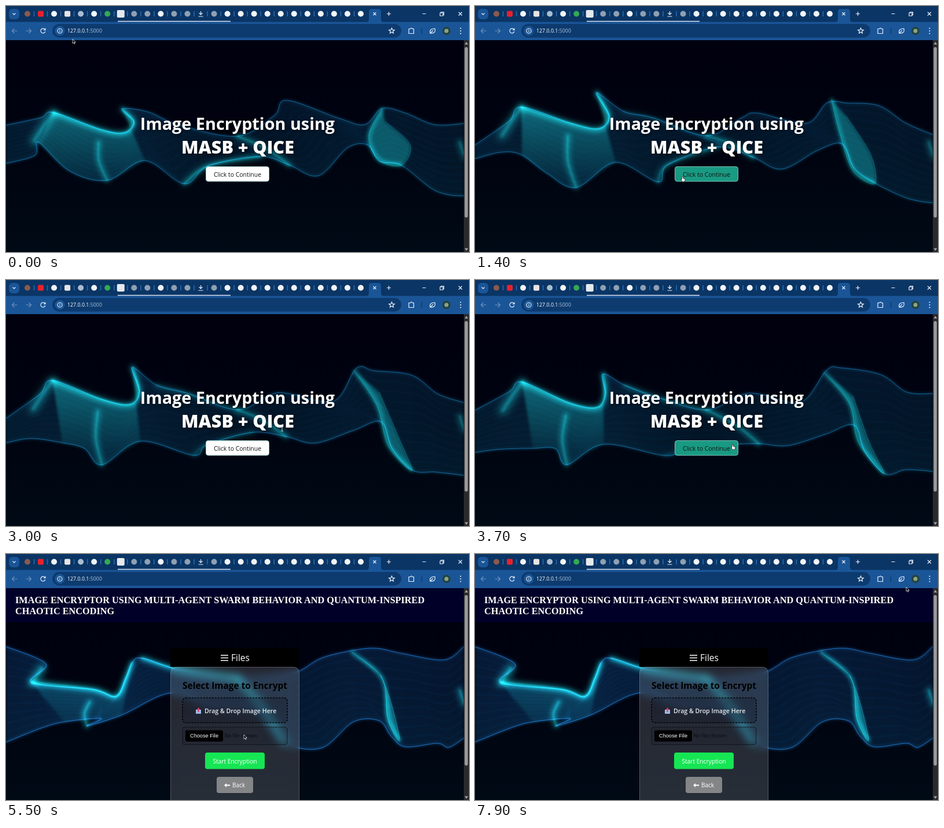
These frames come from a looping animation (800x425 px, 8000 ms). An HTML page with a canvas:

```html
<!DOCTYPE html>
<html lang="en">
<head>
<meta charset="utf-8">
<title>Image Encryption</title>
<style>
html, body { margin: 0; width: 100%; height: 100%; overflow: hidden; background: #00000f; }
canvas, svg, #glass { position: absolute; left: 0; top: 0; }
#glass { left: 284px; top: 195px; width: 221px; height: 260px; border: 1px solid rgba(255,255,255,.2);
  border-radius: 10px; background: rgba(255,255,255,.15); backdrop-filter: blur(7px); }
text { font-family: "Open Sans", "Noto Sans", sans-serif; }
.mid { text-anchor: middle; }
.title { fill: #fff; font-weight: 700; filter: drop-shadow(1px 1px 2px rgba(0,0,0,.7)); }
.serif { font: bold 16.25px "Liberation Serif", serif; fill: #fff; }
.icon { fill: none; stroke: #e8f0fa; stroke-width: 1.2; }
</style>
</head>
<body>
<canvas id="sea" width="800" height="425"></canvas>
<div id="glass"></div>
<svg width="800" height="425" viewBox="0 0 800 425">
  <g id="home">
    <text class="title mid" x="400" y="214" font-size="28.8">Image Encryption using</text>
    <text class="title mid" x="400.5" y="255" style="font-weight:800" font-size="30.6">MASB + QICE</text>
    <rect id="go" x="345.5" y="277.5" width="109" height="25.5" rx="4" stroke="#9fd8d2" stroke-width=".8"/>
    <text class="mid" x="400" y="294.7" font-size="10.45" fill="#111">Click to Continue</text>
  </g>
  <g id="form">
    <rect y="59" width="791" height="59" fill="#010028"/>
    <text class="serif" x="16" y="85">IMAGE ENCRYPTOR USING MULTI-AGENT SWARM BEHAVIOR AND QUANTUM-INSPIRED</text>
    <text class="serif" x="16" y="104">CHAOTIC ENCODING</text>
    <rect x="284" y="163" width="223" height="32"/>
    <path d="M371 175h13m-13 4.5h13m-13 4.5h13" stroke="#fff" stroke-width="1.4"/>
    <text x="389" y="185" font-size="15.5" fill="#fff">Files</text>
    <text class="mid" x="395.5" y="233" font-size="15.45" font-weight="700">Select Image to Encrypt</text>
    <rect x="305" y="248.5" width="181" height="43" rx="6" fill="rgba(20,26,44,.35)" stroke="#000" stroke-width="1.5" stroke-dasharray="3 2"/>
    <path d="M328 269h9v7h-9z" fill="#9db9e6"/>
    <path d="M332.5 265l3 4h-2v4h-2v-4h-2z" fill="#d8375c"/>
    <text x="343" y="275" font-size="10.6" font-weight="600" fill="#e8eaee">Drag &amp; Drop Image Here</text>
    <rect x="305" y="299" width="181" height="30.5" rx="4" fill="rgba(20,26,44,.2)" stroke="#0c1018" stroke-width=".8"/>
    <rect x="310" y="304.5" width="65" height="19.5" rx="3"/>
    <text x="318" y="317.3" font-size="9.2" fill="#fff" style="font-family:'Liberation Sans',sans-serif">Choose File</text>
    <text x="377.5" y="317.3" font-size="8.6" fill="#080b12">No file chosen</text>
    <rect x="344" y="343" width="103" height="28.5" rx="4" fill="#16e554"/>
    <text class="mid" x="395.5" y="361.5" font-size="10.2" fill="#fff">Start Encryption</text>
    <rect x="364" y="385" width="63" height="28" rx="4" fill="#848587"/>
    <path d="M377 399.5l4-3.5v2.5h6v2h-6v2.5z" fill="#fff"/>
    <text x="391" y="403.2" font-size="10" fill="#fff">Back</text>
  </g>
  <rect width="800" height="28" fill="#0a3565"/>
  <rect y="27.5" width="800" height="31.5" fill="#1a5597"/>
  <rect x="5" y="5" width="18" height="18" rx="6" fill="#1a5597"/>
  <path class="icon" d="M11.5 12.5l2.5 2.5 2.5-2.5"/>
  <path d="M622 28q5 0 5-6v-12q0-5 5-5h11q5 0 5 5v12q0 6 5 6z" fill="#1a5597"/>
  <g id="tabs"></g>
  <path d="M193 26.5h195" stroke="#dce7f3" stroke-width="1.5"/>
  <path class="icon" d="M634.5 11l5 5m0-5l-5 5M658 13.5h7m-3.5-3.5v7M719.5 13.5h6M782 10.5l6 6m0-6l-6 6"/>
  <path class="icon" d="M750 12h5v5h-5zm1.500 0v-1.500h5v5h-1.500"/>
  <rect x="80" y="31" width="603" height="23.5" rx="11.7" fill="#0d3b6f"/>
  <path class="icon" opacity=".4" d="M19.5 43h-9m4-4l-4 4 4 4M34.5 43h9m-4-4l4 4-4 4"/>
  <path class="icon" d="M67.5 41a4 4 0 1 0 .3 3M68 38.5v3h-3"/>
  <circle cx="93" cy="43" r="8.5" fill="#1a5597"/>
  <circle class="icon" cx="93" cy="43" r="4"/>
  <path class="icon" d="M93 42.5v2.5m0-4.5v1"/>
  <text x="106" y="46" font-size="8.85" fill="#fff">127.0.0.1<tspan fill="#a9c0da">:5000</tspan></text>
  <path id="star" class="icon"/>
  <path class="icon" d="M696 39.5h3a1.5 1.5 0 0 1 3 0h2.5v8h-8.5z"/>
  <path d="M718.5 38v10" stroke="#0d3b6f" stroke-width="1.5"/>
  <path class="icon" d="M733 47q-2-8 8-8q2 9-8 8l5-5"/>
  <circle cx="761" cy="43" r="7" fill="#24433c"/><circle cx="761" cy="43" r="3.5" fill="#8aa58d"/>
  <path d="M785.5 38.5v10" stroke="#fff" stroke-width="2" stroke-linecap="round" stroke-dasharray="0 4.5"/>
  <rect x="791" y="59" width="9" height="366" fill="#2a2a2c"/>
  <rect x="792.5" y="71" width="5.5" height="294.5" rx="2.7" fill="#9b9b9d"/>
  <path d="M792.5 66.5l3-4.5 3 4.5zM792.5 418.5l3 4.5 3-4.5z" fill="#a5a5a7"/>
  <g id="mouse">
    <path d="M0 0v7.5l1.800-1.600 1.200 2.700 1.200-.5-1.200-2.600h2.400z" fill="#000" stroke="#fff" stroke-width=".7"/>
    <path d="M-2-4h4m-2 0v8m-2 0h4" fill="none" stroke="#c9ccd0"/>
    <path d="M-1 0h2v3l4 1.500-1 4.500h-4l-2.500-4 1.500 0z" fill="#fff" stroke="#111" stroke-width=".7"/>
  </g>
</svg>
<script>
const $ = id => document.getElementById(id);
const ctx = $('sea').getContext('2d');

// Each curve has three poses for the moving page and one for the still page.
const topLeft = [
  [0,206, 60,193, 82,184, 165,214, 205,219, 221,200, 201,178],
  [0,245, 58,200, 80,173, 165,202, 215,212, 233,190, 214,146],
  [0,203, 60,187, 83,181, 160,222, 205,228, 217,205, 224,181],
  [0,160, 69,190, 45,222, 150,234, 190,246, 207,215, 218,188]];
const topMid = [
  [245,183, 300,206, 400,225, 463,190, 485,163, 575,194],
  [260,182, 310,192, 400,224, 460,195, 490,192, 570,206],
  [255,182, 320,214, 400,225, 460,200, 495,195, 560,212],
  [235,180, 300,200, 400,215, 470,210, 507,202, 545,180]];
const topRight = [
  [620,205, 650,177, 690,185, 740,205, 791,203],
  [606,157, 640,163, 700,168, 745,200, 791,222],
  [612,165, 630,147, 700,164, 745,190, 791,174],
  [597,167, 640,163, 685,172, 757,183, 791,160]];
const lowLeft = [
  [0,272, 50,258, 56,235, 110,285, 175,301, 240,267, 308,307],
  [0,268, 45,258, 90,268, 130,290, 172,317, 240,273, 320,303],
  [0,320, 40,317, 100,300, 141,291, 150,317, 210,290, 330,304],
  [0,325, 60,301, 100,290, 164,284, 140,297, 200,278, 284,240]];
const lowMid = [
  [350,276, 440,260, 490,275, 540,293, 590,245],
  [335,277, 420,247, 480,262, 530,280, 595,253],
  [390,304, 455,314, 500,300, 550,293, 610,275],
  [350,262, 430,270, 480,325, 545,335, 600,290]];
const lowRight = [
  [625,240, 645,268, 683,275, 735,315, 765,326, 791,328],
  [640,240, 660,285, 695,317, 740,332, 768,338, 791,341],
  [662,258, 680,300, 715,339, 740,322, 765,319, 791,321],
  [645,288, 665,314, 690,333, 745,327, 765,334, 791,318]];
const fold = [
  [650,178, 627,225, 645,266, 683,275, 698,240, 655,200],
  [607,158, 635,220, 657,288, 695,318, 680,265, 640,190],
  [612,167, 655,212, 664,270, 712,337, 685,285, 665,210],
  [598,170, 650,215, 660,285, 680,322, 666,260, 648,210]];

const path = [[0,115,57], [800,341,307], [2100,380,279], [3000,477,257], [3700,445,284], [4400,431,295],
  [5300,431,295], [5600,404,318], [6400,398,324], [6800,340,342], [7000,340,342], [7900,745,57], [8000,745,57]];

let still, sec, weights;

function pose(c) {
  const flat = still ? c[3] : c[0].map((v, i) => v * weights[0] + c[1][i] * weights[1] + c[2][i] * weights[2]);
  const pts = [];
  for (let i = 0; i < flat.length; i += 2) pts.push([flat[i], flat[i + 1]]);
  return pts;
}

const mix = (a, b, u) => [a[0] + (b[0] - a[0]) * u, a[1] + (b[1] - a[1]) * u];
const shift = (p, dx, dy) => [p[0] + dx, p[1] + dy];

// Catmull-Rom curve through the points
function trace(p, join) {
  join ? ctx.lineTo(...p[0]) : ctx.moveTo(...p[0]);
  for (let i = 0; i < p.length - 1; i++) {
    const a = p[i - 1] || p[i], b = p[i], c = p[i + 1], d = p[i + 2] || c;
    ctx.bezierCurveTo(b[0] + (c[0] - a[0]) / 6, b[1] + (c[1] - a[1]) / 6,
      c[0] - (d[0] - b[0]) / 6, c[1] - (d[1] - b[1]) / 6, ...c);
  }
}

function line(p, width, color, blur) {
  ctx.filter = blur ? `blur(${blur}px)` : 'none';
  ctx.lineWidth = width;
  ctx.strokeStyle = color;
  ctx.beginPath();
  trace(p);
  ctx.stroke();
}

function area(upper, lower, fill) {
  ctx.filter = 'blur(2px)';
  ctx.fillStyle = fill;
  ctx.beginPath();
  trace(upper);
  if (lower) trace([...lower].reverse(), true);
  ctx.closePath();
  ctx.fill();
}

function ramp(x0, y0, x1, y1, ...colors) {
  const g = ctx.createLinearGradient(x0, y0, x1, y1);
  colors.forEach((c, i) => g.addColorStop(i / (colors.length - 1), c));
  return g;
}

function drawSea() {
  const teal = a => `rgba(${still ? '28,215,208' : '22,165,155'},${a})`;
  const blue = a => `rgba(${still ? '30,120,195' : '18,110,150'},${a})`;
  const streak = (p, width, alpha) => {
    line(p, width, teal(alpha), width / 2);
    line(p, width / 3, teal(alpha * .6), width / 6);
  };
  ctx.globalCompositeOperation = 'source-over';
  ctx.filter = 'none';
  ctx.fillStyle = ramp(0, 59, 0, 425, '#00000f', '#00030f', '#000a15');
  ctx.fillRect(0, 0, 800, 425);
  ctx.globalCompositeOperation = 'lighter';
  ctx.lineCap = ctx.lineJoin = 'round';

  const tl = pose(topLeft), ll = pose(lowLeft), loop = pose(fold);
  const up = [...tl, ...pose(topMid), ...pose(topRight)];
  const low = [...ll, ...pose(lowMid), ...pose(lowRight)];
  area(up, low, ramp(0, 0, 791, 0, blue(.2), blue(.25), blue(.14), blue(.2), blue(.16)));
  area(tl.slice(2), ll.slice(2, 6), ramp(0, 180, 0, 300, teal(still ? .25 : .45), teal(.06)));
  area(loop, null, teal(.4));

  for (let k = 1; k < 10; k++) line(up.map((p, i) => mix(p, low[i], k / 10)), 2, blue(.06), 1);

  const dir = still ? -.5 : 1, waist = shift(up[3], -5, 21);
  streak([up[2], shift(up[2], -18 * dir, 25 * dir), shift(up[2], -34 * dir, 50 * dir)], 13, .5);
  streak([waist, shift(mix(waist, low[4], .5), -7, 0), low[4]], 9, .4);
  streak(up.slice(2, 7), 9, .55);
  streak(up.slice(7, 10), 9, still ? .5 : .08 * sec);
  if (!still) streak(low.slice(6, 9), 8, .5 - sec / 10);
  streak([up[9], shift(mix(up[9], low[9], .5), 4, -4), low[9]], 9, .45);
  if (still || sec < 3.5) streak([[784, 235], [788, 248], [794, 262]], 10, .35);

  line(loop.slice(0, 4), 6, teal(.5), 3);
  for (const edge of [up, low]) {
    line(edge, 3, blue(.35), 2);
    line(edge, .9, blue(.7));
  }
  line(loop, 1, teal(.3), .5);
}

function mouseAt(t) {
  const i = path.findIndex(k => k[0] > t), [t0, ...a] = path[i - 1], [t1, ...b] = path[i];
  const u = (t - t0) / (t1 - t0);
  return mix(a, b, u * u * (3 - 2 * u));
}

function drawTabs() {
  const grey = '#8fa0b3', white = '#f2f5f8';
  const colors = ['#8b5a4c', '#e8222c', white, '#e9e4e2', '#a9bdd2', white, '#35a853', '#e6e9ee',
    grey, grey, white, grey, grey, white, grey];
  let out = '';
  for (let i = 0; i < 26; i++) {
    const x = 37 + i * 23.04, fill = colors[i] || white, r = i === 7 ? 6.5 : 5;
    if (i === 13) out += `<path class="icon" d="M${x} 9v6m-3-3l3 3 3-3m-7 6h8"/>`;
    else out += `<rect x="${x - r}" y="${13.5 - r}" width="${2 * r}" height="${2 * r}"
      rx="${[1, 3, 7].includes(i) ? 2 : r}" fill="${fill}"/>`;
    if (i < 25) out += `<path d="M${x + 11.5} 9v9" stroke="#2c6cb0" stroke-width="1.5"/>`;
  }
  $('tabs').innerHTML = out;
  const star = Array.from({ length: 10 }, (_, i) => {
    const a = i * Math.PI / 5, r = i % 2 ? 2.2 : 5;
    return [666.5 + r * Math.sin(a), 43 - r * Math.cos(a)];
  });
  $('star').setAttribute('d', `M${star.join('L')}Z`);
}

let last = -1;
function frame() {
  const t = Math.floor(performance.now() % 8000 / 100) * 100;
  if (t !== last) {
    last = t;
    const was = still, s = sec = Math.min(t, 4500) / 1000;
    still = t >= 5000;
    weights = [(s - 2.1) * (s - 4.4) / 9.24, s * (s - 4.4) / -4.83, s * (s - 2.1) / 10.12];
    if (!still || !was) drawSea();
    $('home').style.display = still ? 'none' : '';
    $('form').style.display = $('glass').style.display = still ? '' : 'none';

    const [x, y] = mouseAt(t);
    const over = !still && x > 346 && x < 454 && y > 280 && y < 303;
    const onText = !still && x > 232 && x < 568 && y > 188 && y < 262;
    $('go').setAttribute('fill', over ? '#199a82' : '#fff');
    $('mouse').setAttribute('transform', `translate(${x} ${y})`);
    const shape = over ? 2 : onText ? 1 : 0;
    [...$('mouse').children].forEach((el, i) => el.style.display = i === shape ? '' : 'none');
  }
  requestAnimationFrame(frame);
}
drawTabs();
frame();
</script>
</body>
</html>
```
